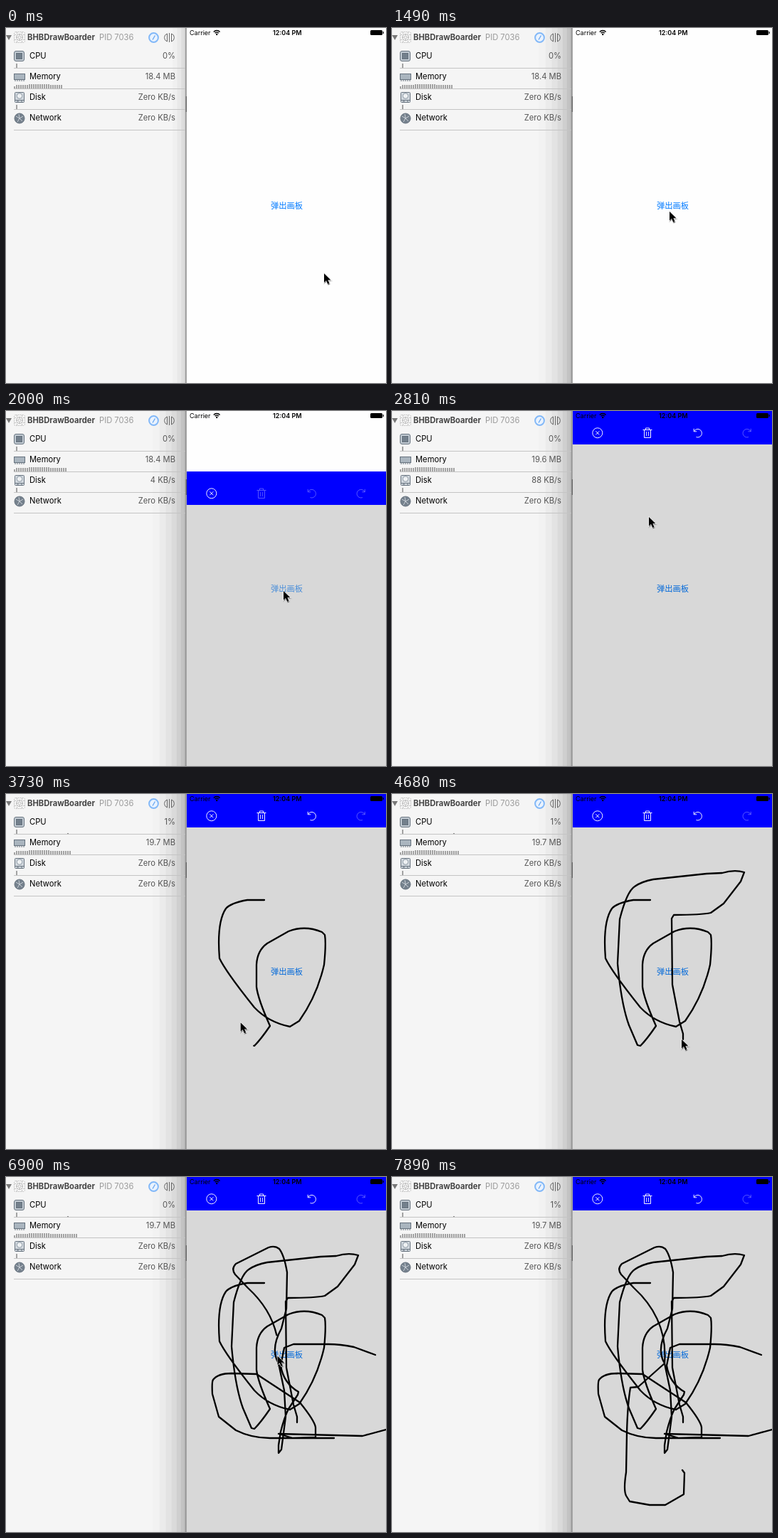
Write an HTML page that moves like this. It is 534 by 499 pixels and loops after 8310 ms.

```html
<!DOCTYPE html>
<html lang="en">
<head>
<meta charset="utf-8">
<title>Drawing board</title>
<style>
html, body { margin: 0; width: 100%; height: 100%; overflow: hidden; background: #fefefe; }
svg { display: block; }
text { font-family: Inter, "Liberation Sans", sans-serif; font-size: 11.2px; }
.value { fill: #555; text-anchor: end; }
.status text { font-size: 9px; }
.zh { font-family: "Noto Sans CJK SC", "Noto Sans CJK", sans-serif; font-size: 11.25px; fill: #007aff; }
.icon { fill: none; stroke: #fff; stroke-width: .95; }
.ink path { fill: none; stroke: #000; stroke-width: 2.3; stroke-linecap: round; stroke-linejoin: round; }
</style>
</head>
<body>
<svg width="534" height="499" viewBox="0 0 534 499">
  <defs>
    <clipPath id="phone"><rect x="254" width="280" height="499"/></clipPath>
    <path id="undo" d="M424.2 24.8v4h4M424.5 28.5A5.8 5.8 0 1 1 427.5 36.6"/>
  </defs>

  <rect width="253" height="499" fill="#f5f5f5"/>
  <g id="softShadow"></g>
  <g id="deepShadow"></g>

  <path d="M0 10h8l-4 7z" fill="#777"/>
  <g fill="none" stroke="#c2c2c2">
    <rect x="11.5" y="5.5" width="15" height="15" rx="2" stroke-dasharray="2 1"/>
    <path d="M15.5 6v14M22.5 6v14M12 9.5h14M12 16.5h14" stroke-dasharray="2 1"/>
    <circle cx="19" cy="13" r="4.5"/><circle cx="19" cy="13" r="2"/>
  </g>
  <text x="30" y="17" font-weight="700" font-size="11.4" fill="#454545">BHBDrawBoarder</text>
  <text x="131" y="17" fill="#9a9a9a">PID 7036</text>
  <circle cx="207.5" cy="13.5" r="6.4" fill="#eaf3fe" stroke="#82b8f8" stroke-width="2"/>
  <path d="M206 16.5l3.5-6" stroke="#6ca9f2" stroke-width="1.4"/>
  <path d="M226.5 8a5.8 5.8 0 0 0 0 11zM232.5 8a5.8 5.8 0 0 1 0 11zM229.5 7v13" fill="none" stroke="#666"/>

  <g stroke="#66727e">
    <rect x="11.5" y="32.5" width="14" height="14" rx="2.5" fill="#c3ccd4"/>
    <rect x="14.5" y="35.5" width="8" height="8" fill="#73808c"/>
    <rect x="11.5" y="64.5" width="15" height="8" fill="#aab5bf"/>
    <path d="M12 74h15" stroke-dasharray="2 1"/>
    <rect x="12.5" y="90.5" width="13" height="14" rx="1" fill="#d3d9df"/>
    <circle cx="19" cy="95.5" r="3.8" fill="#eef1f3" stroke="#8c98a4"/>
    <path d="M13 101.5h12M15 103h3M21 103h2"/>
    <circle cx="19" cy="127" r="7" fill="#75818d"/>
  </g>
  <path d="M14 124l5 3 5-3M19 127l-3 5M19 127l4 4M19 127l-1-6" fill="none" stroke="#dde3e8" stroke-width=".8"/>

  <path d="M11 56.5h241M11 85.5h241M11 114.5h241M11 143.5h241" stroke="#c4c4c4"/>
  <text x="33" y="43">CPU</text><text x="33" y="72">Memory</text>
  <text x="33" y="101">Disk</text><text x="33" y="130">Network</text>
  <text class="value" id="cpu" x="238" y="43"></text>
  <text class="value" id="memory" x="238" y="72"></text>
  <text class="value" id="disk" x="238" y="101"></text>
  <text class="value" x="238" y="130">Zero KB/s</text>
  <path d="M14 50h2v6h-2zM14 108h2v6h-2z" fill="#a2a2a2"/>
  <rect id="cpuDot" x="86" y="55" width="2" height="1" fill="#8a8a8a"/>
  <path id="bars" fill="#a2a2a2"/>

  <rect x="254" width="280" height="499" fill="#fefefe"/>
  <g clip-path="url(#phone)">
    <text class="zh" id="button" x="372" y="253.5">弹出画板</text>
    <g id="board">
      <rect x="254" width="280" height="47" fill="#00f"/>
      <rect x="254" y="47" width="280" height="460" fill="#000" fill-opacity=".15"/>
      <g class="icon">
        <path d="M286.3 28.3l5 5M291.3 28.3l-5 5"/><circle cx="288.8" cy="30.8" r="7"/>
        <g id="edit">
          <path d="M352.5 26.5h13M356.5 26v-2h5v2M354.5 27v10.5h9V27"/>
          <path d="M357.5 29v6M360.5 29v6" stroke-width=".8"/>
          <use href="#undo"/>
        </g>
        <use href="#undo" transform="translate(928.5) scale(-1 1)" opacity=".35"/>
      </g>
    </g>
    <g class="ink" id="ink"></g>
    <g class="status">
      <text x="258" y="10">Carrier</text>
      <text x="375" y="10" font-weight="600">12:04 PM</text>
      <path d="M291.8 5.4a6 6 0 0 1 8.8 0M293.6 7.2a3.7 3.7 0 0 1 5.2 0" fill="none" stroke="#000" stroke-width="1.4"/>
      <circle cx="296.2" cy="9" r="1.2"/>
      <rect x="512" y="3" width="17" height="7" rx="1.5"/><rect x="529.7" y="5" width="1.2" height="3" rx=".6"/>
    </g>
  </g>
  <path d="M253 0v499" stroke="#858585" stroke-width="1.4"/>
  <path d="M253.3 96v22" stroke="#555"/>
  <g id="cursor">
    <path d="M.5 2v12.8l3-2.7 2.2 4.8 2.3-1-2.1-4.6h4z" stroke="#000" stroke-opacity=".12" stroke-width="2"/>
    <path d="M0 1v12.8l3-2.7 2.2 4.8 2.3-1-2.1-4.6h4z" stroke="#fff" stroke-width="1.2" paint-order="stroke"/>
  </g>
</svg>
<script>
const LOOP = 8310, STEP = 57.5, LEAD = 50, MEMORY_BARS = 23;
const $ = id => document.getElementById(id);
const clamp = v => Math.max(0, Math.min(1, v));
const mix = (a, b, p) => a + (b - a) * p;

// Window shadow: flat bands that narrow and darken towards the edge
function addShadow(id, width, count, drop) {
  for (let i = 0; i < count; i++) {
    const w = width * (1 - i / count) ** 1.5;
    const g = Math.round(245 - drop * ((i + 1) / count) ** 1.5);
    $(id).innerHTML += `<rect x="${253 - w}" width="${w}" height="499" fill="rgb(${g},${g},${g})"/>`;
  }
}
addShadow("softShadow", 19, 4, 37);
addShadow("deepShadow", 47, 7, 63);

// Pointer legs: a glide follows a straight line, a stroke follows its curve and leaves ink
const legs = [];
let last = { x: 449, y: 345 };

function glide(t0, t1, x, y) {
  const a = last, b = { x, y };
  legs.push({ t0, t1, at: p => ({ x: mix(a.x, b.x, p), y: mix(a.y, b.y, p) }) });
  last = b;
}

function stroke(t0, t1, d) {
  const path = $("ink").appendChild(document.createElementNS("http://www.w3.org/2000/svg", "path"));
  path.setAttribute("d", d);
  const length = path.getTotalLength();
  legs.push({ t0, t1, path, length, at: p => path.getPointAtLength(length * p) });
  last = path.getPointAtLength(length);
}

glide(850, 1290, 392, 258);
glide(1600, 1750, 392, 253);
glide(2380, 2800, 363, 149);
stroke(2860, 4640, `M363 149H339Q316 153 309 161Q296 180 300 231Q309 250 349 300Q369 321 399 327
  L412 319Q437 284 447 240Q450 210 448 198L444 194Q420 184 397 193L367 210Q353 220 352 240V271
  Q354 288 371 326Q358 345 349 354L345 353L333 325Q322 295 317 238L320 176Q330 137 341 130
  Q351 123 367 120L442 112L464 111Q481 106 495 110L490 123L466 154L448 167Q435 170 396 170
  L393 175L394 268L404 320L409 337V345`);
glide(4910, 5000, 461, 367);
stroke(5010, 5560, `M461 367H371Q345 367 323 356L299 337L290 305Q289 288 291 285Q298 276 317 276
  L352 277L413 317Q434 343 435 352V366L403 367L383 361L501 364L534 355L560 345`);
glide(5560, 5595, 519, 250);
stroke(5595, 7520, `M519 250L489 239Q470 235 453 235H404L391 240L386 265Q390 290 411 302L410 306
  L397 326Q391 338 386 358L383 377V388L387 383L393 337L391 300L383 262Q371 242 387 213L394 185
  L395 134Q391 110 384 101Q378 96 369 99L323 122Q316 129 322 137L340 156Q388 200 383 262
  L346 295L335 296Q331 320 330 360L329 415Q325 440 329 448L334 456L362 461H384L410 446L411 416L408 412`);
glide(7790, 7890, 500, 499);

const progress = (leg, t) => clamp((t - leg.t0) / (leg.t1 - leg.t0));

function drawInk(t) {
  for (const leg of legs.filter(l => l.path)) {
    const p = progress(leg, t);
    leg.path.style.display = p > 0 ? "" : "none";
    leg.path.setAttribute("stroke-dasharray", p < 1 ? `${leg.length * p} ${leg.length * 2}` : "none");
  }
}

function drawCursor(t) {
  const leg = legs.filter(l => l.t0 <= t).pop() || legs[0];
  const { x, y } = leg.at(progress(leg, t));
  $("cursor").setAttribute("transform", `translate(${x - 2} ${y - 1})`);
  $("cursor").style.display = t < legs[legs.length - 1].t1 ? "" : "none";
}

// The gauges refresh once a second
function drawGauges(t) {
  const tick = t < 540 ? -1 : Math.floor((t - 480) / 1000);
  const busy = tick === 3 || tick === 4 || tick >= 7;
  $("cpu").textContent = busy ? "1%" : "0%";
  $("memory").textContent = (tick < 2 ? "18.4" : tick < 3 ? "19.6" : "19.7") + " MB";
  $("disk").textContent = t < 1550 || tick >= 3 ? "Zero KB/s" : tick < 2 ? "4 KB/s" : "88 KB/s";
  $("cpuDot").style.display = tick >= 3 ? "" : "none";
  let d = "";
  for (let i = 0; i <= MEMORY_BARS + tick; i++) {
    const h = i === 0 ? 3 : i > 6 && i < 17 ? 6 : 5;
    d += `M${11 + 3 * i} ${85 - h}h2v${h}h-2z`;
  }
  $("bars").setAttribute("d", d);
}

function drawBoard(t) {
  const pressed = t > 1610 && t < 2180;
  $("button").setAttribute("opacity", pressed ? mix(0.2, 1, clamp((t - 1770) / 400)) : 1);
  const left = 1 - clamp((t - 1855) / 330);
  $("board").setAttribute("transform", `translate(0 ${Math.ceil(499 * left ** 3)})`);
  $("edit").setAttribute("opacity", t >= 2750 ? 1 : 0.35);
}

function draw(t) {
  // The screen advances in fixed steps
  const q = Math.max(0, 3210 + Math.floor((t - 3202) / STEP) * STEP);
  $("deepShadow").style.display = t >= 680 ? "" : "none";
  drawGauges(t);
  drawBoard(q);
  drawInk(q);
  drawCursor(q + LEAD);
}

const begin = performance.now();
function frame() {
  draw((performance.now() - begin) % LOOP);
  requestAnimationFrame(frame);
}
frame();
</script>
</body>
</html>
```
